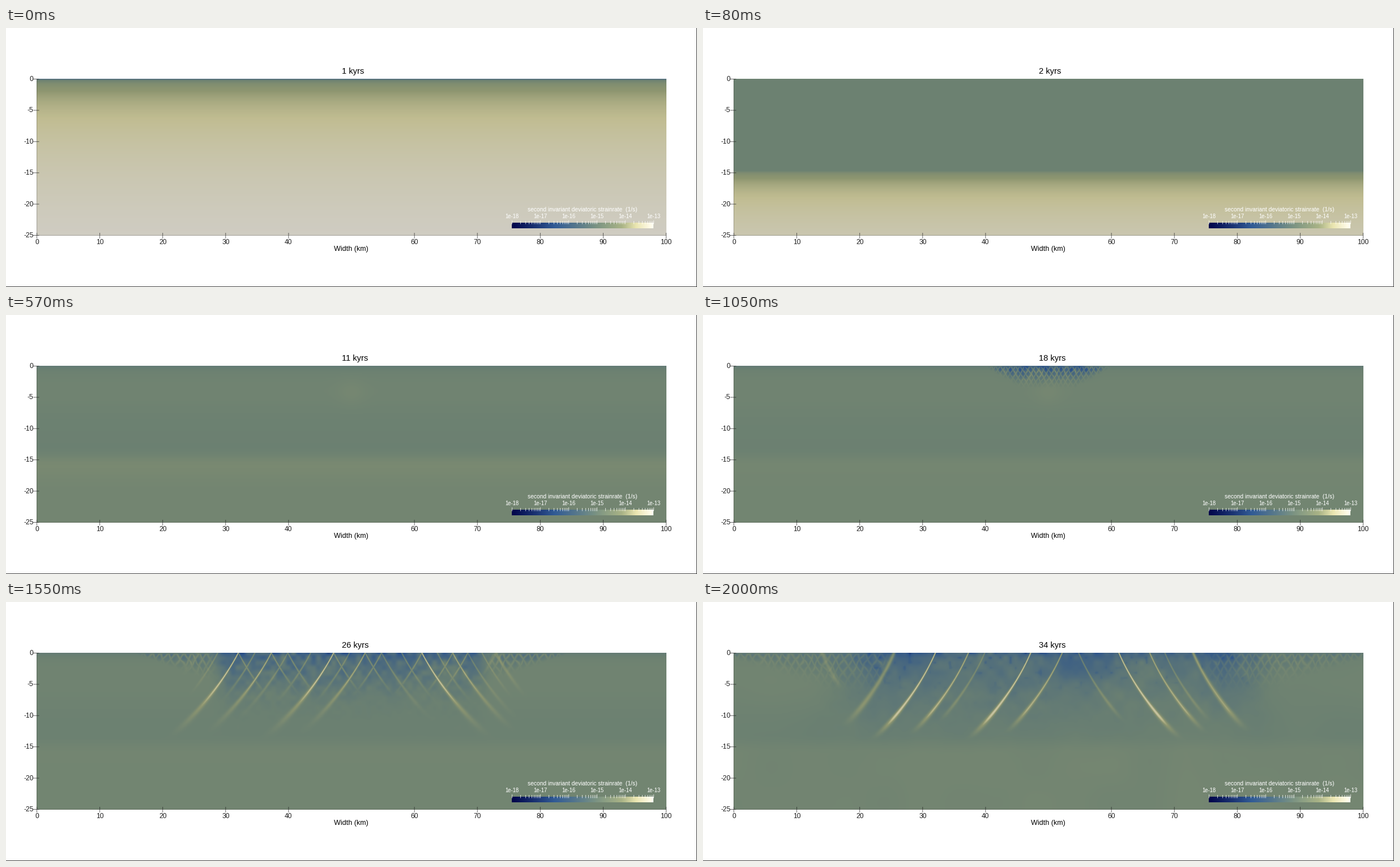
A matplotlib script for the animation above (2.03 s loop, 1220x459 px).

```python
from functools import lru_cache

import matplotlib.pyplot as plt
import numpy as np
from matplotlib.animation import FuncAnimation
from matplotlib.collections import LineCollection

W, H, DPI = 1220, 459, 64
X0, Y0, NX, NY = 54, 90, 1112, 278
PX_KM = 11.115
STEP, FRAMES = 10, 203
FONT = "Liberation Sans"

# Colour stops over the logarithmic strain rate, 0 = 1e-18 and 1 = 1e-13
PALETTE = {0: (0, 5, 74), .3: (45, 84, 138), .6: (107, 128, 113),
           .78: (142, 150, 112), .88: (192, 188, 145), 1: (207, 204, 194)}

# Surface positions (km) of the main shear bands by dip direction
LEFT = (25.5, 32.05, 37.3, 39.9, 47.2, 52.2)
RIGHT = (54.8, 61.2, 66.1, 68.5, 73)

x = ((np.arange(NX) + .5) / PX_KM)[None, :]
d = ((np.arange(NY) + .5) / PX_KM)[:, None]
r = abs(x - 50)


def smooth(u):
    u = np.clip(u, 0, 1)
    return u * u * (3 - 2 * u)


def bell(u):
    return np.exp(-u * u)


def noise(cell, seed):
    """Smooth random field from -1 to 1 with the given cell size in km."""
    nx, ny = int(100 / cell) + 2, int(25 / cell) + 2
    grid = np.random.default_rng(seed).uniform(-1, 1, (ny, nx))
    gx, gy = x / cell, d / cell
    ix, iy = gx.astype(int), gy.astype(int)
    fx, fy = smooth(gx - ix), smooth(gy - iy)
    upper = grid[iy, ix] * (1 - fx) + grid[iy, ix + 1] * fx
    lower = grid[iy + 1, ix] * (1 - fx) + grid[iy + 1, ix + 1] * fx
    return upper * (1 - fy) + lower * fy


FINE, MID, WIDE = noise(.8, 4), noise(1.7, 7), noise(6, 2)


def stages(k):
    """Progress of the first hatching, the main bands and their late state."""
    return smooth((k - 13) / 5), smooth((k - 18) / 8), smooth((k - 26) / 8)


def loading(k):
    """Early viscous profile; from 2 kyr on only the lower crust flows."""
    if k == 1:
        return .72 + .2 * np.log10(d)
    return np.maximum(.605, .75 + .2 * np.log10(np.maximum(d - 14.5, .01)))


def settled(k):
    """Stiff upper crust over a weak layer that relaxes with time."""
    k = max(k, 4)
    u = np.exp((4 - k) / 2.5)
    layer = .035 + .04 * u
    layer += .1 * np.exp((4 - k) / 6) * bell((d - 15.5 - 1.5 * u) / (2.5 + 1.5 * u))
    warm = .025 * bell((d - 4) / (2.5 + .1 * k)) - .06 * np.exp(-d / .5)
    return .603 + smooth((d - 13) / 3) * layer + smooth((k - 4) / 7) * warm


def profile(k):
    mix = np.clip((k - 2) / 2, 0, 1)
    return (1 - mix) * loading(k) + mix * settled(k)


def hatch(k):
    """Fine crossing bands that spread outwards from the middle."""
    start, mid, late = stages(k)
    outer = np.clip(10.5 + 3.05 * (k - 18), 2, 53)
    inner = 25 - 30 * np.exp((18 - k) / 4)
    gap = .8 + .5 * mid
    reach = (3.5 + .16 * (k - 18)) * np.clip((outer - r) / (3 + .3 * outer), .01, 1)
    mask = smooth(1.1 - d / reach) * smooth((r - inner) / 3)
    mask = mask * smooth((outer - r) / 3) * smooth(d / .35)
    mask = mask * start * (1 - .35 * mid - .25 * late)
    lines = 0
    for side in (-1, 1):
        phase = (x + side * .62 * d) / gap + .25 * MID + .1 * FINE
        lines = np.maximum(lines, (.5 + .5 * np.cos(2 * np.pi * phase)) ** 4)
    return mask * (.23 * lines - .16 * (1 + .4 * FINE))


def quiet(k):
    """Drop in strain rate between the shear bands."""
    start, mid, late = stages(k)
    half = 9 + 14 * mid + 14 * late
    deep = 1.3 + 4.9 * mid + 2.4 * late
    edge = smooth((half + .3 * d * late - r) / (4 + 8 * late))
    grain = (.4 - .3 * late) * FINE + .3 * MID + .25 * WIDE
    drop = (.07 + .08 * mid - .02 * late) * bell(d / deep) * (1 + grain)
    drop = drop + .07 * np.exp(-d / .8) * (1 + FINE)
    spots = smooth((FINE - .6) / .4) * bell(d / 5)
    calm = bell((x - 54.5) / 6) * bell((d - 2.2) / 2.2)
    return start * edge * (drop + .07 * late * (spots + calm))


def make_bands():
    """List of (surface x, dip side, reach, mid strength, late strength)."""
    out = [(14, 1, 8, 0, .45)]
    for side, group, before in ((-1, LEFT, 22), (1, RIGHT, LEFT[-1])):
        for fx in group:
            gap = fx - before
            power = min(1, gap / 6.4)
            out.append((fx, side, 9 + 4.5 * power, power, power))
            out.append((fx, -side, 7, .5, 0))
            if gap > 4:
                out.append((fx - gap / 2, side, 8, .45, 0))
            before = fx
    return out


BANDS = make_bands()


def bands(k):
    _, _, late = stages(k)
    top = d[:168]
    offset = (.52 - .09 * late) * top + .02 * top ** 2
    width = .11 + (.0045 - .0015 * late) * top ** 2
    hold = .25 + .45 * late
    out = np.zeros((NY, NX))
    for fx, side, reach, mid, end in BANDS:
        far = abs(fx - 50) / 24.5
        grow = smooth((k - 18.5 - 6 * far ** 2) / 4)
        power = grow * (mid + (end - mid) * late)
        if power < .01:
            continue
        fade = 1 - smooth((top / (reach * grow) - hold) / (1.05 - hold))
        w = width + .2 * smooth((far - .85) / .15)
        shape = bell((x - fx - side * offset) / w) * fade * power
        out[:168] = np.maximum(out[:168], shape)
    return out


def paint(v, shine=0):
    level = np.linspace(0, 1, 1024)
    table = np.array(list(PALETTE.values()), float)
    lut = np.stack([np.interp(level, list(PALETTE), c) for c in table.T], -1)
    lut = np.minimum(lut * (1 + shine * level[:, None]), 255)
    return np.round(lut[(np.clip(v, 0, 1) * 1023).astype(int)]).astype(np.uint8)


@lru_cache(maxsize=None)
def field(k):
    v = profile(k) + np.zeros((NY, NX))
    glow = smooth((k - 4) / 6) * smooth((25 - k) / 6)
    v += .025 * glow * bell((x - 50) / 2.2) * bell((d - 4.2) / 2)
    if k > 13:
        v += hatch(k) - quiet(k) - .01 * stages(k)[2] * WIDE
        m = bands(k)
        v = v * (1 - m) + .93 * m
    return paint(v)


def age(ms):
    # 60 ms for each kyr, with one short pause
    held = min(max(ms - 990, 0), 50)
    return (ms + 90 - held) // 60


fig = plt.figure(figsize=(W / DPI, H / DPI), dpi=DPI, facecolor="white")
ax = fig.add_axes([0, 0, 1, 1])
ax.axis("off")


def label(px, py, text, size, color="#1c1c1c", ha="center"):
    return ax.text(px, py, text, fontsize=size * 72 / DPI, family=FONT,
                   color=color, ha=ha, va="baseline")


def strokes(segments, color, width=1, alpha=1):
    lines = LineCollection(segments, colors=color, alpha=alpha,
                           linewidths=width * 72 / DPI)
    lines.set_snap(False)
    ax.add_collection(lines)


def picture(pixels, extent):
    return ax.imshow(pixels, extent=extent, interpolation="nearest",
                     aspect="auto")


image = picture(field(1), (X0, X0 + NX, Y0 + NY, Y0))

# Axes
ticks = []
for i in range(6):
    py = 90.5 + 55.4 * i
    ticks.append([(48, py), (58.5, py)])
    label(48.5, py + 3.5, str(-5 * i), 12, ha="right")
for i in range(11):
    if i != 5:
        px = 54.5 + 111.1 * i
        ticks.append([(px, 363), (px, 373)])
        label(px, 383, str(10 * i), 12)
strokes(ticks, "#202020", .9, .75)
strokes([[(54, 367.5), (1166, 367.5)], [(54.5, 90), (54.5, 368)]],
        "#303030", .7, .4)
strokes([[(1219.5, 0), (1219.5, H)], [(0, 458.5), (W, 458.5)]], "#404040")
label(609.5, 394.5, "Width (km)", 12.5, "black")
title = label(593, 81.5, "", 14.6, "black", "left")

# Colour scale
picture(paint(np.linspace(0, 1, 250)[None, :], .25), (893, 1143, 355, 345.5))
marks = []
for i in range(6):
    px = 893.5 + 50 * i
    marks.append([(px, 341), (px, 347.5)])
    label(px, 337, f"1e-{18 - i}", 9.5, "white")
    if i < 5:
        minor = px + 50 * np.log10(np.arange(2, 10))
        marks += [[(m, 342), (m, 347.5)] for m in minor]
strokes(marks, "white", .8, .9)
label(1017.5, 325, "second invariant deviatoric strainrate  (1/s)", 10.2, "white")

ax.set_xlim(0, W)
ax.set_ylim(H, 0)


def draw(i):
    k = age(i * STEP)
    image.set_data(field(k))
    title.set_text(f"{k} kyrs")
    return image, title


anim = FuncAnimation(fig, draw, frames=FRAMES, interval=STEP, repeat=True,
                     repeat_delay=0, blit=False)
plt.show()
```
